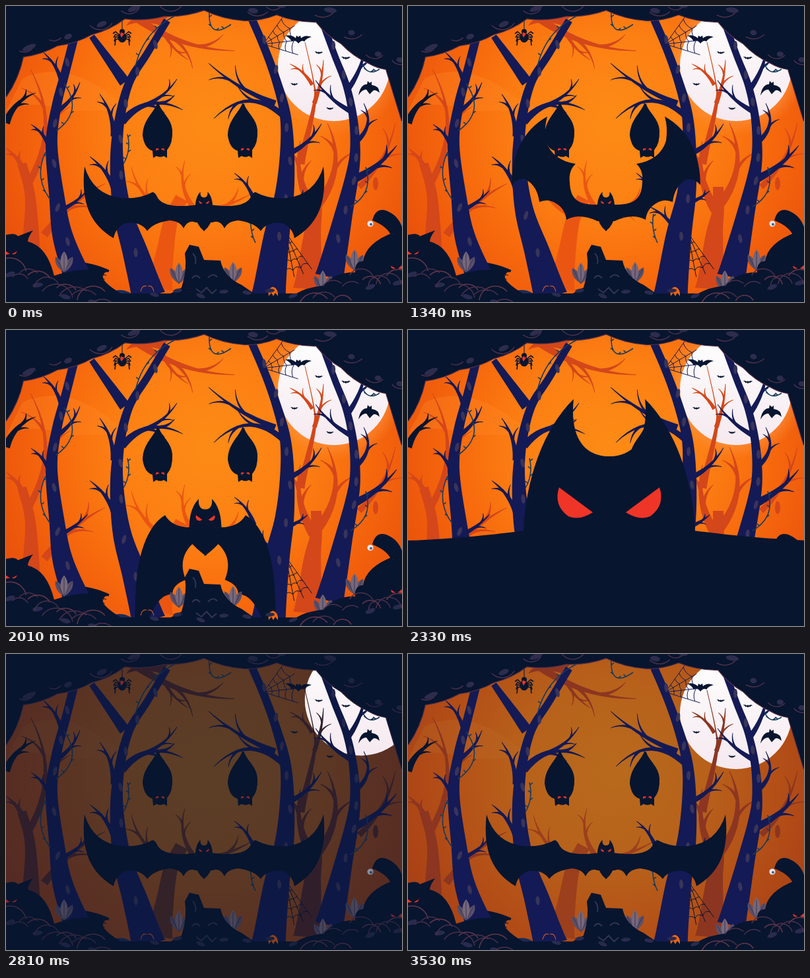
An HTML page with a canvas for the animation above (3.57 s loop, 600 by 450 pixels).

```html
<!DOCTYPE html>
<html lang="en">
<head>
<meta charset="utf-8">
<title>Halloween forest</title>
<style>
html, body { margin: 0; width: 100%; height: 100%; overflow: hidden; background: #07152f; }
canvas { display: block; }
</style>
</head>
<body>
<canvas id="stage" width="600" height="450"></canvas>
<script>
const c = document.getElementById('stage').getContext('2d');
const LOOP = 3570, NAVY = '#07152f', BARK = '#141a55', RUST = '#d3471a', EMBER = '#ea5612', VIOLET = '#4b2f49', RED = '#ef3527';
const clamp = x => Math.max(0, Math.min(1, x));
const rgb = h => [1, 3, 5].map(i => parseInt(h.slice(i, i + 2), 16));
const svg = d => new Path2D(d);
const night = rgb(NAVY);
let light = 1; // 0 = silhouette, 1 = full colour
let seed;
const rnd = (a = 0, b = 1) => a + (b - a) * (seed = seed * 16807 % 2147483647) / 2147483647;

const ink = h => `rgb(${rgb(h).map((v, i) => Math.round(night[i] + (v - night[i]) * light))})`;

function fill(color, path) {
  c.fillStyle = ink(color);
  path ? c.fill(path) : c.fill();
}
function line(color, w, path) {
  c.strokeStyle = ink(color);
  c.lineWidth = w;
  path ? c.stroke(path) : c.stroke();
}
function oval(color, x, y, rx, ry = rx, tilt = 0) {
  c.beginPath();
  c.ellipse(x, y, rx, ry, tilt, 0, 7);
  fill(color);
}
function curl(color, x, y, r, a, b) {
  c.beginPath();
  c.arc(x, y, r, a, b);
  line(color, 1.5);
}
function at(x, y, sx, sy, draw) {
  c.save();
  c.translate(x, y);
  c.scale(sx, sy);
  draw();
  c.restore();
}
const pairs = flat => flat.flatMap((v, i) => i % 2 ? [] : [[v, flat[i + 1]]]);

// Catmull-Rom samples through key points
function spline(flat) {
  const p = pairs(flat), n = p.length - 1, out = [];
  const get = i => p[Math.max(0, Math.min(n, i))];
  for (let i = 0; i < n; i++) for (let s = 0; s < 8 + (i === n - 1); s++) {
    const u = s / 8, [a, b, d, e] = [-1, 0, 1, 2].map(o => get(i + o));
    out.push([0, 1].map(k => b[k] + u / 2 * (d[k] - a[k] +
      u * (2 * a[k] - 5 * b[k] + 4 * d[k] - e[k] + u * (3 * (b[k] - d[k]) + e[k] - a[k])))));
  }
  return out;
}

// Samples of a bowed line; bend is the sideways offset per unit length
const bow = (x0, y0, x1, y1, bend) => Array.from({ length: 13 }, (_, i) => {
  const u = i / 12, s = 4 * u * (1 - u) * bend;
  return [x0 + (x1 - x0) * u - (y1 - y0) * s, y0 + (y1 - y0) * u + (x1 - x0) * s];
});

// Tapered stroke: width runs from w0 to w1 along the samples
function limb(color, w0, w1, p, power = 1) {
  const n = p.length - 1, left = [], right = [];
  p.forEach(([x, y], i) => {
    const a = p[Math.max(0, i - 1)], b = p[Math.min(n, i + 1)];
    const dx = b[0] - a[0], dy = b[1] - a[1], h = Math.hypot(dx, dy) || 1;
    const w = (w0 + (w1 - w0) * (i / n) ** power) / 2;
    left.push([x - dy / h * w, y + dx / h * w]);
    right.unshift([x + dy / h * w, y - dx / h * w]);
  });
  c.beginPath();
  left.concat(right).forEach(q => c.lineTo(...q));
  fill(color);
}

function bough(color, w, x0, y0, x1, y1, bend = .08) {
  const p = bow(x0, y0, x1, y1, bend), len = Math.hypot(x1 - x0, y1 - y0);
  limb(color, w, .8, p);
  [5, 8].forEach((k, i) => {
    const [x, y] = p[k], [nx, ny] = p[k + 1];
    const a = Math.atan2(ny - y, nx - x) + (i ? -.65 : .65), l = len * (.34 - .08 * i);
    limb(color, w * .45, .7, bow(x, y, x + l * Math.cos(a), y + l * Math.sin(a), i ? .1 : -.1));
  });
}

function trunk(color, w0, w1, ...flat) {
  const p = spline(flat);
  limb(color, w0, w1, p, 2.6);
  if (color === BARK) for (let i = 6; i < p.length - 4; i += 7) {
    oval('#39345a', p[i][0] + rnd(-1, 6), p[i][1], 3, 7, rnd(-.3, .4));
  }
}

function vine(...arc) {
  const p = bow(...arc);
  c.beginPath();
  p.forEach(q => c.lineTo(...q));
  p.forEach(([x, y], i) => {
    if (i % 3 !== 1) return;
    c.moveTo(x, y);
    c.lineTo(x + (i % 2 ? 4 : -4), y - 3);
  });
  line('#173b5c', 1.6);
}

function web(color, x, y, r, from, to) {
  const spoke = (i, d) => {
    const a = from + (to - from) * i / 3;
    return [x + d * Math.cos(a), y + d * Math.sin(a)];
  };
  c.beginPath();
  for (let i = 0; i < 4; i++) {
    c.moveTo(x, y);
    c.lineTo(...spoke(i, r));
    for (let d = r * .25; i < 3 && d < r; d += r * .2) {
      c.moveTo(...spoke(i, d));
      c.quadraticCurveTo(...spoke(i + .5, d * .88), ...spoke(i + 1, d));
    }
  }
  line(color, 1);
}

function plant(x, y, len) {
  [-.5, .5, 0].forEach(angle => {
    const l = angle ? len * .85 : len;
    c.save();
    c.translate(x, y);
    c.rotate(angle);
    fill(angle ? '#5b5068' : '#77687b', svg(`M0 0Q${-l * .34} ${-l * .6} 0 ${-l}Q${l * .34} ${-l * .6} 0 0`));
    line('#3d3954', 1, svg(`M0 0V${-l * .9}`));
    c.restore();
  });
}

function sky(lum) {
  light = lum;
  const g = c.createRadialGradient(310, 180, 20, 310, 185, 370);
  [[0, '#fd8a15'], [.35, '#fc7f13'], [.62, '#f7690d'], [1, '#e64d0b']].forEach(([o, h]) => g.addColorStop(o, ink(h)));
  c.fillStyle = g;
  c.fillRect(0, 0, 600, 450);
  c.globalAlpha = .3;
  fill('#fd8c28', svg('M25 110Q90 80 165 140L205 158L90 160Q40 140 0 160Z'));
  c.globalAlpha = 1;
}

function moon(off, glow) {
  const x = 497 + 85 * off, y = 90 - 43 * off;
  if (glow) {
    const g = c.createRadialGradient(x, y, 82, x, y, 107);
    g.addColorStop(0, `rgba(255,150,74,${glow})`);
    g.addColorStop(1, 'rgba(255,140,50,0)');
    c.fillStyle = g;
    c.fillRect(x - 108, y - 108, 216, 216);
  }
  const g = c.createLinearGradient(0, y - 84, 0, y + 84);
  g.addColorStop(0, '#ffffff');
  g.addColorStop(1, '#f5e9ef');
  c.fillStyle = g;
  c.beginPath();
  c.arc(x, y, 85, 0, 7);
  c.fill();
}

function backTrees() {
  trunk(EMBER, 20, 42, 266, 292, 250, 325, 240, 380, 232, 430);
  bough(EMBER, 10, 252, 320, 190, 245, -.12);
  bough(EMBER, 8, 282, 304, 271, 235, -.12);
  bough(EMBER, 12, 258, 312, 372, 285);

  trunk(RUST, 14, 40, 24, 240, 36, 285, 38, 340, 36, 420);
  bough(RUST, 12, 30, 258, 0, 216);
  bough(RUST, 11, 34, 270, 37, 96, .14);
  bough(RUST, 12, 58, 348, 150, 270, -.06);
  fill(RUST, svg('M182 30Q195 8 245 16L235 30Q205 20 182 30'));
  bough(RUST, 13, 195, 16, 346, 68);
  bough(RUST, 7, 235, 32, 276, 82);

  trunk(RUST, 16, 46, 470, 275, 470, 310, 464, 350, 458, 430);
  bough(RUST, 16, 466, 310, 446, 205, -.1);
  trunk(RUST, 1, 13, 453, 55, 466, 115, 467, 150, 446, 240);
  bough(RUST, 7, 467, 148, 481, 82, .04);
  bough(RUST, 6, 464, 120, 430, 88);
  bough(RUST, 14, 474, 300, 487, 178, .15);
  bough(RUST, 9, 535, 275, 590, 178);
  oval(RUST, 560, 270, 4, 10);
}

function frontTrees() {
  web(NAVY, 424, 345, 68, .95, 1.6);
  web(BARK, 390, 58, 55, -.95, .3);
  web(NAVY, 128, 403, 25, 0, .8);

  bough(BARK, 8, 85, 118, 56, 70);
  bough(BARK, 8, 78, 160, 112, 116);
  bough(BARK, 8, 66, 215, 38, 180);
  bough(BARK, 8, 80, 312, 124, 280, .05);
  limb(NAVY, 24, 3, bow(100, 400, 156, 403, -.05));
  bough(NAVY, 12, 0, 178, 45, 132, -.12);
  trunk(BARK, 13, 42, 104, 45, 90, 100, 77, 150, 69, 210, 77, 290, 86, 350, 108, 412);

  limb(BARK, 17, 9, bow(180, 116, 130, 46, 0));
  bough(BARK, 12, 176, 176, 268, 158, -.2);
  bough(BARK, 7, 210, 151, 259, 111, .08);
  bough(BARK, 9, 163, 198, 142, 134);
  bough(BARK, 10, 166, 284, 127, 229);
  trunk(BARK, 11, 52, 244, 22, 214, 72, 186, 118, 171, 180, 168, 240, 176, 310, 196, 375, 216, 442);

  bough(BARK, 10, 424, 170, 315, 171, .24);
  bough(BARK, 9, 408, 148, 307, 87, -.05);
  bough(BARK, 9, 428, 225, 478, 179, .08);
  bough(BARK, 8, 424, 300, 457, 281, .05);
  bough(BARK, 8, 408, 345, 364, 304);
  bough(BARK, 7, 376, 296, 346, 254);
  trunk(BARK, 12, 52, 370, 14, 392, 65, 410, 115, 423, 165, 426, 220, 422, 285, 410, 350, 398, 440);

  bough(BARK, 9, 517, 128, 545, 48);
  bough(BARK, 8, 522, 160, 469, 113, -.06);
  bough(BARK, 8, 530, 207, 542, 148, .2);
  bough(BARK, 13, 526, 264, 592, 212, .06);
  trunk(BARK, 10, 44, 477, 18, 498, 75, 516, 122, 526, 170, 529, 220, 524, 260, 513, 310, 502, 360, 490, 412);

  vine(88, 118, 76, 190, -.25);
  vine(60, 222, 67, 294, .15);
  vine(184, 195, 178, 240, -.1);
  vine(258, 14, 196, 92, .12);
  vine(308, 10, 341, 28, .5);
  vine(372, 316, 378, 360, .08);
  vine(545, 245, 522, 305, -.2);
  vine(540, 88, 566, 96, .3);
}

function spider() {
  line(NAVY, 1, svg('M176 10V38'));
  for (const side of [-1, 1]) for (let i = 0; i < 4; i++) at(176, 46, side, 1, () =>
    line(NAVY, 1.6, svg(`M2 ${i}L10 ${i * 4 - 7}L${14 - i} ${i * 6 - 4}`)));
  oval(NAVY, 176, 48, 6.5, 7.5);
  oval(NAVY, 176, 39, 4);
  fill(RED, svg('M174 40L179 42L175 48L173 44Z'));
}

const flyer = svg('M-20 -5Q-10 -7 -4 -1L-3 -5L0 -3L3 -5L4 -1Q10 -7 20 -3Q12 -1 9 4Q5 1 0 7Q-4 1 -10 4Q-13 -2 -20 -5');
const glider = svg('M-16 3Q-13 -14 -3 -14L-2 -19L1 -16L4 -18L4 -13Q15 -12 16 -1Q9 -7 6 -4L1 1L-4 -6Q-11 -6 -16 3');
const hung = svg('M-4 -67C-8 -54 -26 -42 -26 -18Q-23 2 -11 5L-10 16L-5 13Q1 16 6 13L11 16L11 4Q20 -6 19 -26C18 -44 2 -54 -1 -66Z');
function hanger(x) {
  at(x, 215, 1, 1, () => {
    fill(NAVY, hung);
    fill(RED, svg('M-6 5L-1 3Q-2 0 -6 2ZM7 5L2 3Q3 0 7 2Z'));
  });
}

// Right halves of the big bat, mirrored when drawn
const wings = {
  up: svg('M-1 0L13 2C40 2 54 -4 55 -32Q57 -50 46 -60Q82 -66 91 -95Q94 -115 89 -132C125 -112 143 -75 143 -28Q132 -40 121 -36Q104 -26 101 -2Q88 -8 76 0Q62 8 60 25Q40 14 13 27H-1Z'),
  down: svg('M-1 4L13 6Q27 6 33 -4C48 5 56 30 57 60L60 137Q48 60 27 61Q27 53 16 49Q23 32 11 20H-1Z'),
  spread: svg('M-1 2L13 2.5C25 4 60 8 70 -8Q74 -17 78 -17Q98 -6 125 -8Q168 -13 181 -56C187 0 172 32 137 53Q134 36 118 30Q96 27 86 42Q76 29 52 26Q36 27 31 38Q24 24 13 29H-1Z')
};
const poses = Object.keys(wings);
const eye = svg('M7.6 -4.1L2.5 -.3Q4.6 1 6.2 .3Q8.5 -1.4 7.6 -4.1');

function bat(pose, s, x, y) {
  const tip = pose === 'down' ? 29 : 42;
  const body = svg(`M-1 -8.8H0C4 -8.8 6 -12 5.4 -17.5C10 -13 12.8 -5 13 3L14 14Q12 ${tip - 9} 0 ${tip}H-1Z`);
  const sides = draw => [-1, 1].forEach(m => at(x, y, s * m, s, draw));
  sides(() => { fill(NAVY, wings[pose]); fill(NAVY, body); });
  sides(() => fill(RED, eye));
}

// Wing beats on the spot, then a charge that grows by a fixed ratio per beat
function flight(t) {
  const charge = Math.floor((t - 1930) / 80), beat = Math.floor((t - 1335) / 98);
  if (charge >= 0 && t < 2410) {
    const k = charge - 1;
    return [poses[charge % 3], 1.85 * 1.525 ** k, 302 + .75 * k, 289 - 2.2 * k];
  }
  return [beat >= 0 && beat < 5 ? poses[beat % 3] : 'spread', 1, 300, 300];
}

function bushCurls(dir) {
  for (let i = 0; i < 12; i++) {
    const d = i * 14, x = dir > 0 ? d + 6 : 594 - d, y = 380 + d * .3 + rnd(0, 36), r = rnd(15, 27);
    curl(i % 3 ? VIOLET : '#66364a', x, y + r, r, rnd(3.2, 4), rnd(5.2, 6.2));
    if (i % 3 === 0) oval('#292b4d', x, y + r, 8, 3.5, rnd(-.4, .4));
  }
}

function ground() {
  fill('#1b2b55', svg('M150 440Q170 425 190 437V450H150Z'));
  pairs([88, 405, 262, 422, 344, 421, 480, 434, 528, 402]).forEach(([x, y]) => plant(x, y, 32));
  fill(NAVY, svg('M0 348Q14 344 18 350L41 341Q33 352 33 358Q62 365 73 410Q112 396 156 403Q130 410 174 437H440Q455 428 480 425Q500 404 529 405Q528 388 541 388Q545 360 588 344L600 350V450H0Z'));
  fill(NAVY, svg('M244 440L266 428Q275 400 271 376L278 363L292 366L300 386L325 387Q330 412 357 424L380 440Z'));
  fill(NAVY, svg('M555 326Q560 306 576 311Q594 318 600 336V350H584Q578 335 555 326'));
  oval('#e9e4ea', 552, 331, 4.6);
  oval('#4b6486', 553, 332, 2);

  fill('#f0660f', svg('M398 441Q396 428 405 427Q413 430 412 441L408 436L405 441L402 436Z'));
  line('#c45a22', 1.2, svg('M204 434Q206 424 213 426M215 426Q222 424 224 434'));
  bushCurls(1);
  bushCurls(-1);
  line('#33334f', 2, svg('M283 376Q289 382 287 392M282 414Q288 406 294 414M306 413Q314 405 320 412M288 430L296 436L304 428L312 437L319 431'));
  for (let x = 225; x < 440; x += 35) oval('#292b4d', x, rnd(432, 442), 7, 3, rnd(-.4, .4));
  fill(RED, svg('M0 373L6 377L0 378ZM17 373L9 377Q14 379 17 373ZM583 395L590 399Q584 401 583 395ZM600 394L594 399L600 400Z'));
}

function canopy() {
  const edge = pairs([0, 138, 26, 77, 78, 60, 130, 43, 180, 19, 240, 15, 300, 6, 362, 22, 410, 13, 470, 24, 508, 57, 550, 87, 576, 96, 600, 175]);
  c.beginPath();
  edge.forEach(([x, y], i) => {
    if (!i) return c.moveTo(x, y);
    const [px, py] = edge[i - 1], k = i < edge.length - 1 ? .1 : 0;
    c.quadraticCurveTo((px + x) / 2 - (y - py) * k, (py + y) / 2 + (x - px) * k, x, y);
  });
  line('#5a2f45', 2.4);
  c.lineTo(600, 0);
  c.lineTo(0, 0);
  fill(NAVY);
  edge.slice(1, -1).forEach(([x, y]) => {
    const r = rnd(15, 24);
    curl(VIOLET, x + rnd(-8, 22), y - r - 7, r, rnd(.2, .8), rnd(1.9, 2.6));
    oval('#2d2c4d', x + rnd(4, 22), y - rnd(13, 20), rnd(5, 12), 4, x < 300 ? -.4 : .15);
  });
}

function draw(t) {
  const dawn = t >= 2490, step = Math.floor((t - 2490) / 40) * 40; // light returns in 40 ms steps
  seed = 31;
  if (t >= 2410 && !dawn) {
    c.fillStyle = NAVY;
    c.fillRect(0, 0, 600, 450);
    return;
  }
  sky(dawn ? .18 + .54 * step / 1040 : 1);
  moon(dawn ? (1 - step / 1040) ** 2 : 0, dawn ? 0 : .4 + .2 * clamp((Math.floor((t - 900) / 40) + 1) / 7));
  light = dawn ? step / 1600 : 1;
  backTrees();
  light = dawn ? clamp(step / 560) : 1;
  [[443, 50, 1], [474, 71, .32], [515, 79, .36], [437, 119, .3], [491, 156, .3]].forEach(([x, y, s]) =>
    at(x, y, s, s, () => fill(NAVY, flyer)));
  at(550, 133, 1, 1, () => fill(NAVY, glider));
  frontTrees();
  spider();
  hanger(233);
  hanger(362);
  const pose = flight(t), close = pose[1] > 2;
  if (!close) bat(...pose);
  ground();
  if (close) bat(...pose);
  canopy();
}

function tick() {
  draw(performance.now() % LOOP);
  requestAnimationFrame(tick);
}
tick();
</script>
</body>
</html>
```
